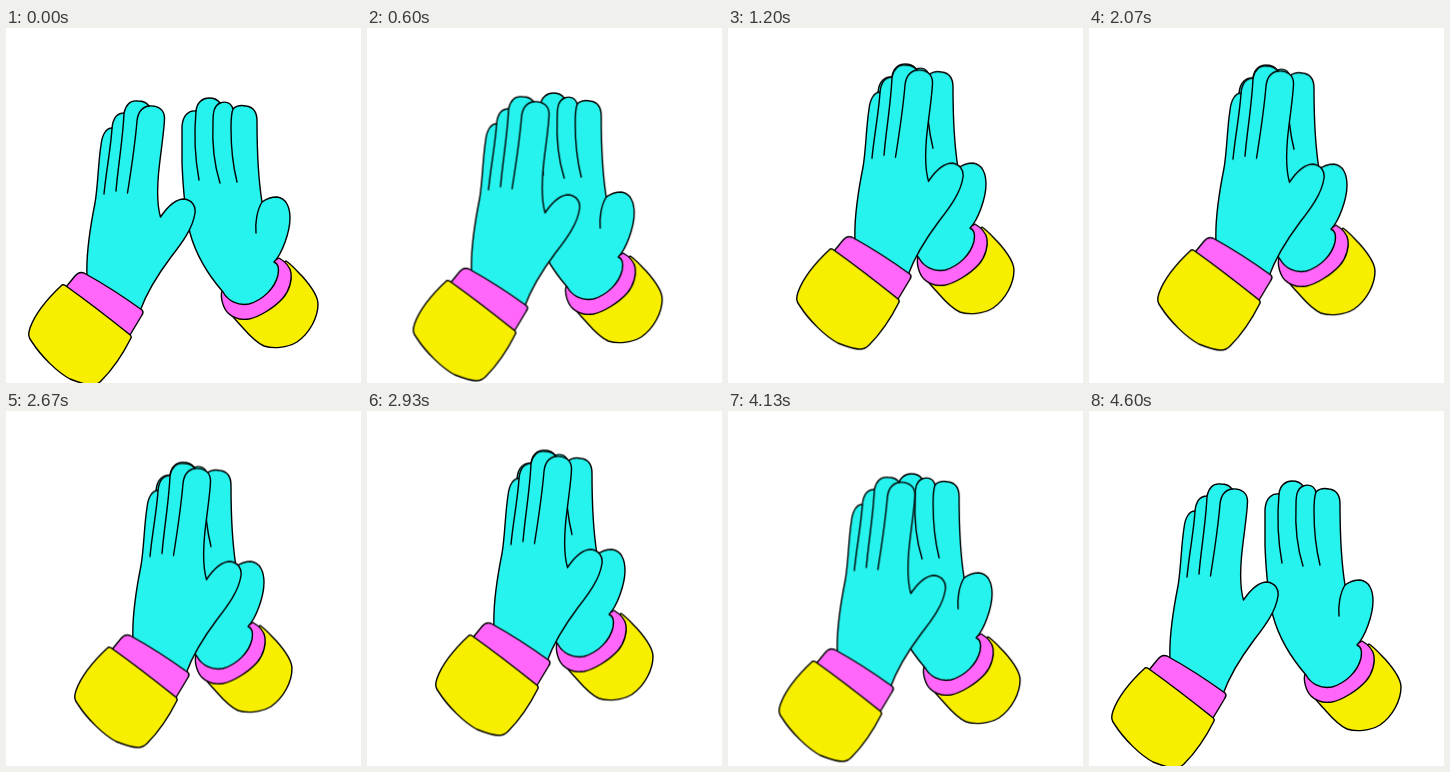
These frames come from a looping animation (355x355 px, 4990 ms). An HTML page:

```html
<!DOCTYPE html>
<html lang="en">
<head>
<meta charset="utf-8">
<title>Folding hands</title>
<style>
  html, body { margin: 0; width: 100%; height: 100%; overflow: hidden; background: #fff; }
  svg { display: block; width: 100%; height: 100%; }
  path { stroke: #000; stroke-width: 1.4; stroke-linecap: round; stroke-linejoin: round; }
  .skin { fill: #27f3ee; }
  .band { fill: #ff66f9; }
  .sleeve { fill: #f7ee00; }
  .crease { fill: none; }
</style>
</head>
<body>
<svg viewBox="0 0 355 355">
  <g id="back">
    <path class="sleeve" d="M217 274C222 285 230 292 237 300C244 308 251 315 258 318C267 321 281 320 291 314C304 305 312 289 312 276C312 267 304 257 296 248C291 243 286 237 280 233L250 260Z"/>
    <path class="band" d="M216 263C214 269 217 280 222 285C228 291 236 292 243 291C253 289 268 280 277 270C284 262 286 251 285 245C284 239 280 234 273 230L240 250Z"/>
    <path class="skin" d="M217 264C204 249 190 227 184 205C179 185 177 160 176 135L176 98C177 87 183 82 190 83C191 74 197 70 203 70C208 70 212 72 214 75C220 73 225 75 227 81C230 78 235 77 240 78C248 79 251 84 251 93C251 120 252 149 256 174C260 171 265 169 271 169C280 170 284 179 284 190C284 204 276 226 268 234C273 236 273 242 272 247C269 260 257 272 243 276C232 278 222 273 217 264Z"/>
    <path class="crease" d="M190 83C188 105 189 130 193 152M214 75C208 78 207 84 207 94C206 115 208 136 214 155M227 81C225 86 225 92 225 100C225 120 227 138 231 154M256 174C251 182 249 195 250 205"/>
  </g>
  <g id="front">
    <path class="skin" d="M81 249C80 228 84 200 89 175C92 158 92 136 95 117C96 107 100 100 106 100C107 90 111 85 118 85C120 76 125 72 132 73C137 73 141 75 143 78C152 77 159 82 158.500 91C158 105 154 129 152.500 146C151 163 151 177 154.500 189C162 178 170 171 178 171C186 172 190 178 189 185C187 200 176 215 165 229C153 245 142 261 134 283Z"/>
    <path class="crease" d="M106 100C105 119 100 144 98 166M118 85C117 111 112 138 110 163M143 78C136 79 132 84 131 93C129 117 125 143 121.500 165"/>
    <path class="band" d="M60 259L69 248Q73 243 78 245C98 256 118 269 136 282Q138 284 136 287L124 307Z"/>
    <path class="sleeve" d="M56 257C42 270 29 286 24 300C22 306 22 309 26 314C35 328 51 344 64 351C74 355 81 357 86 357Q91 357 95 353C107 341 117 326 125 310Q126 308 123 306C103 290 81 273 60 258Q58 256 56 257Z"/>
  </g>
</svg>
<script>
  const LOOP = 4990, STEP = 200 / 3, COUNT = 75;
  const OPEN_UNTIL = 6, CLOSED_AT = 21, DIP_AT = 38, PART_AT = 54, OPEN_AT = 69;
  const DIP_DEPTH = 18, DIP_SPAN = 8.5;

  const ease = (u, start, end) => 1 - (1 - u ** start) ** end;
  const phase = (n, from, to) => Math.min(1, Math.max(0, (n - from) / (to - from)));

  // 0 = hands apart, 1 = palms together
  const closeness = n => n <= PART_AT
    ? ease(phase(n, OPEN_UNTIL, CLOSED_AT), 1.5, 4.2)
    : 1 - ease(phase(n, PART_AT, OPEN_AT), 1.5, 1.8);

  const dip = n => {
    const d = Math.abs(n - DIP_AT) / DIP_SPAN;
    return d < 1 ? DIP_DEPTH * Math.cos(d * Math.PI / 2) ** 2 : 0;
  };

  // Quadratic curve starting at the origin
  const curve = (t, bend, end) => 2 * t * (1 - t) * bend + t * t * end;

  function play(id, bend, end) {
    const frames = Array.from({ length: COUNT }, (_, n) => {
      const t = closeness(n);
      const x = curve(t, bend[0], end[0]);
      const y = curve(t, bend[1], end[1]) + dip(n);
      return {
        offset: Math.round(n * STEP / 10) * 10 / LOOP,
        transform: `translate(${x.toFixed(2)}px, ${y.toFixed(2)}px)`,
        easing: 'steps(1, end)'
      };
    });
    frames.push({ ...frames[0], offset: 1 });
    document.getElementById(id).animate(frames, { duration: LOOP, iterations: Infinity });
  }

  play('front', [42.5, -1], [46, -36.2]);
  play('back', [-32, -3], [-26, -34.2]);
</script>
</body>
</html>
```
